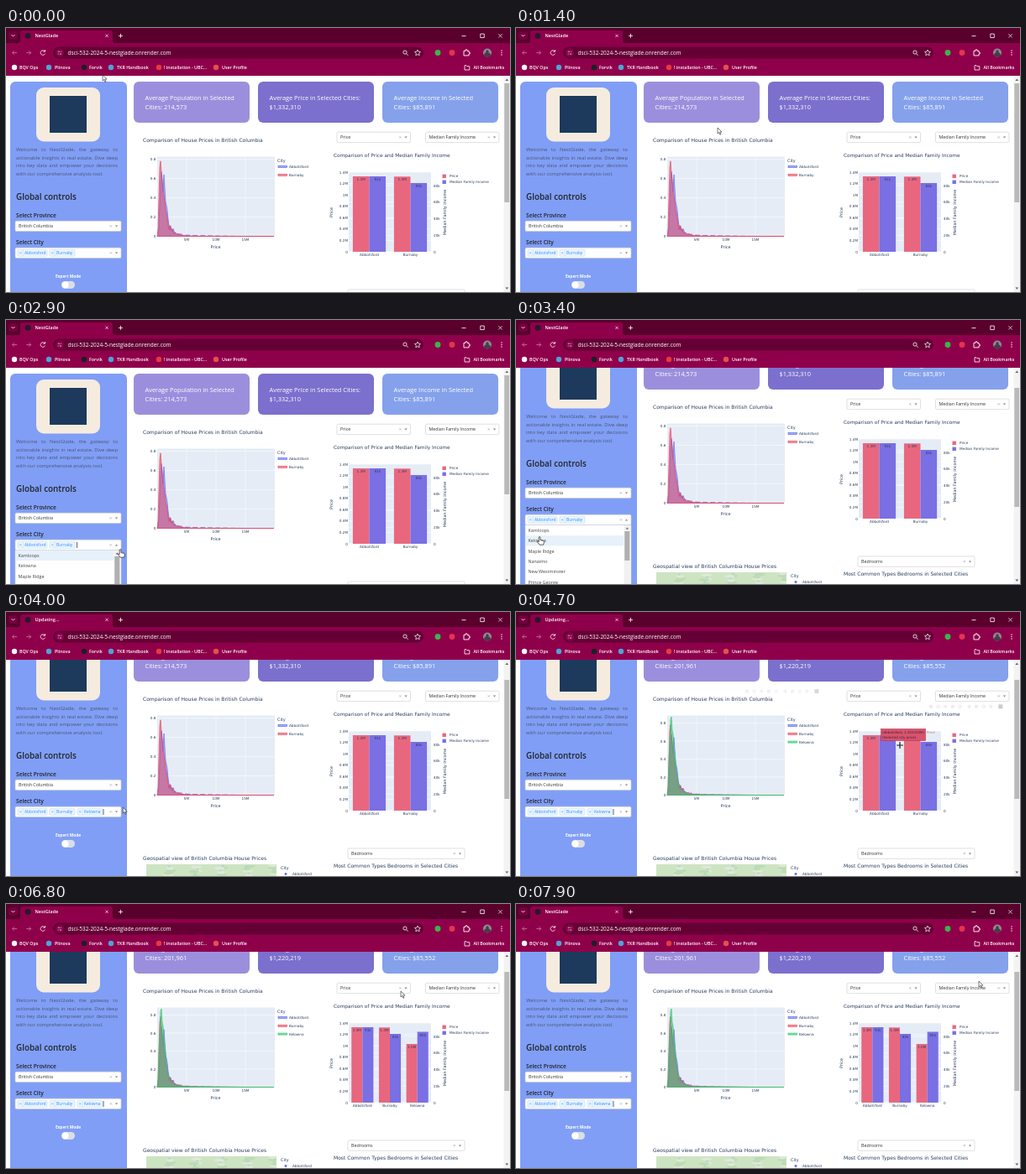
These frames come from a looping animation (600x315 px, 8000 ms). An HTML page:

```html
<!DOCTYPE html>
<html lang="en">
<head>
<meta charset="utf-8">
<title>NestGlade</title>
<style>
html, body { margin: 0; width: 100%; height: 100%; overflow: hidden; background: #fff; }
svg { display: block; width: 100vw; height: 100vh; font-family: "Open Sans", "Noto Sans", sans-serif; }
.plot { font-family: "DejaVu Sans", sans-serif; }
.intro { font-size: 5.9px; line-height: 9.5px; color: #4b5675; white-space: nowrap; }
.intro div { text-align-last: justify; }
.intro div:last-child { text-align-last: left; }
</style>
</head>
<body>
<svg id="stage" viewBox="0 0 600 315"></svg>
<script>
const LOOP = 8000, STEP = 100;
const T = { open: 2800, scroll: 3000, pick: 3700, data: 4300, bars: 6800 };
const INK = '#2a3f5f', BLUE = '#5f6df0', RED = '#e9455c', GREEN = '#2fc76b';
const PINK = '#e8677f', VIOLET = '#7a6fe3';

const rect = (x, y, w, h, fill, extra = '') =>
  `<rect x="${x}" y="${y}" width="${w}" height="${h}" fill="${fill}" ${extra}/>`;
const circle = (x, y, r, fill, extra = '') => `<circle cx="${x}" cy="${y}" r="${r}" fill="${fill}" ${extra}/>`;
const text = (x, y, s, size, fill = '#fff', extra = '') =>
  `<text x="${x}" y="${y}" font-size="${size}" fill="${fill}" ${extra}>${s}</text>`;
const line = (d, color, width = .8, extra = '') =>
  `<path d="${d}" fill="none" stroke="${color}" stroke-width="${width}" ${extra}/>`;
const shape = (d, fill, extra = '') => `<path d="${d}" fill="${fill}" ${extra}/>`;
const cross = (x, y, r, color, w = .7) =>
  line(`M${x - r} ${y - r}l${2 * r} ${2 * r}m0 ${-2 * r}l${-2 * r} ${2 * r}`, color, w);
const group = (s, extra) => `<g ${extra}>${s}</g>`;
const MID = 'text-anchor="middle"', END = 'text-anchor="end"', BOLD = 'font-weight="600"';

const clamp = v => Math.max(0, Math.min(1, v));
const smooth = v => (v = clamp(v), v * v * (3 - 2 * v));
const pulse = (t, a, b, c, d) => clamp((t - a) / (b - a)) * clamp((d - t) / (d - c));

function browser(t) {
  const busy = t >= T.pick && t < T.bars;
  const marks = [
    [10, 16, 'BQV Ops', '#f4f4f4'], [51, 58, 'Plinova', '#4fa3d8'], [93, 99, 'Forvik', '#1b1f24'],
    [125, 132, 'TKR Handbook', '#4fa3d8'], [182, 188, '! installation - UBC...', '#e33c3c'],
    [250, 257, 'User Profile', '#e0524a']];
  return rect(0, 0, 600, 57, '#8f004b') + rect(0, 0, 600, 18, '#59002d') +
    rect(3, 4, 11, 10, '#74003e', 'rx="3"') + line('M6.5 8l2 2 2-2', '#fff') +
    shape('M14 18q3 0 3-3V6q0-3 3-3h104q3 0 3 3v9q0 3 3 3z', '#8f004b') +
    circle(26, 9.3, 3.4, '#241a2b') +
    text(34.5, 11.4, busy ? 'Updating...' : 'NestGlade', 5.5, '#fff', BOLD) +
    cross(120, 9.3, 1.6, '#fff') + line('M134 9.3h5m-2.5-2.5v5', '#fff') +
    line('M542.5 9.5h5', '#fff') + line('M564.8 7h4.5v4.5h-4.5z', '#fff') + cross(588.5, 9.3, 2.2, '#fff') +
    line('M13 29.5h-5.4m2.3-2.3l-2.3 2.3 2.3 2.3', '#c27ba0') +
    line('M24.3 29.5h5.4m-2.3-2.3l2.3 2.3-2.3 2.3', '#c27ba0') +
    line('M46.3 28a2.8 2.8 0 1 0 .2 2.6m0-4.6v2.2h-2.2', '#fff') +
    rect(56, 22.5, 441, 14, '#650035', 'rx="7"') +
    circle(64, 29.5, 5, '#86004a') + line('M61.7 28.2h2.6m1 0h1m-4.6 2.8h1m1 0h2.6', '#fff', .7) +
    text(73.5, 32, 'dsci-532-2024-5-nestglade.onrender.com', 6.45) +
    circle(475, 29, 2.1, 'none', 'stroke="#fff" stroke-width=".8"') + line('M476.6 30.7l2 2', '#fff') +
    line('M490 26l1 2.2 2.5.3-1.8 1.7.5 2.5-2.2-1.2-2.2 1.2.5-2.5-1.8-1.7 2.5-.3z', '#fff', .7) +
    circle(514, 29.5, 3.4, '#39b54a') + circle(531, 29.5, 3.4, '#e5344e') +
    line('M545 27.3h2v-1.4h2v1.4h2v1.8h1.2v1.8h-1.2v2h-6z', '#fff', .9) +
    circle(573, 29.5, 5, '#8d8a93') + shape('M568.8 32.3a4.3 4.3 0 0 1 8.4 0a5 5 0 0 1-8.4 0z', '#453d48') +
    circle(573, 28, 1.7, '#453d48') +
    [27, 29.5, 32].map(y => circle(590, y, .7, '#fff')).join('') +
    marks.map(([x, tx, s, c]) => circle(x, 47, 3.2, c) + text(tx, 49.2, s, 5.3, '#fff', BOLD)).join('') +
    line('M546 44.7h2l.8 1h3v4.3h-5.8z', '#fff') + text(556.5, 49.2, 'All Bookmarks', 5.3, '#fff', BOLD);
}

function select(x, y, w, label = '', open = false) {
  const ax = x + w - 7.2;
  return rect(x, y, w, 12.4, '#fff', 'rx="1.5" stroke="#ccc" stroke-width=".6"') +
    text(x + 4, y + 8.2, label, 5.3, '#333') + cross(x + w - 12.2, y + 6.2, 1, '#999', .6) +
    shape(open ? `M${ax} ${y + 7.2}h3.4l-1.7-2z` : `M${ax} ${y + 5.4}h3.4l-1.7 2z`, '#888');
}

function tag(x, w, s) {
  return rect(x, 264.4, w, 8, '#ebf5ff', 'rx="1" stroke="#b9dbff" stroke-width=".5"') +
    line(`M${x + 6.2} 264.4v8`, '#b9dbff', .5) + cross(x + 3.2, 268.4, .9, '#2a8cff', .5) +
    text(x + 8, 270.3, s, 4.9, '#2a8cff');
}

function menu(t) {
  const items = ['Kamloops', 'Kelowna', 'Maple Ridge', 'Nanaimo', 'New Westminster', 'Prince George', 'Richmond'];
  const active = t < 3200 ? 0 : 1;
  return rect(11, 274.5, 126, 90, '#fff', 'stroke="#ccc" stroke-width=".6"') +
    rect(11.3, 274.8 + active * 12.4, 117, 12.2, '#e6f1fb') +
    items.map((s, i) => text(14.5, 282.7 + i * 12.4, s, 5.4, '#444')).join('') +
    rect(128.5, 275, 8, 89, '#f1f1f1') + rect(129.3, 282, 6, 35, '#b0b0b0') +
    shape('M130.6 279.6h3.6l-1.8-2z', '#666');
}

function sidebar(t) {
  const picked = t >= T.pick, open = t >= T.open && !picked;
  const caretOn = t >= T.open && (t - (picked ? T.pick : T.open)) % 1000 < 500;
  const intro = ['Welcome to NestGlade, the gateway to', 'actionable insights in real estate. Dive deep',
    'into key data and empower your decisions', 'with our comprehensive analysis tool.'];
  return rect(5, 64, 139, 400, '#809ef5', 'rx="6"') +
    rect(36, 71, 76, 64.5, '#f5ecdf', 'rx="9"') + rect(52, 81, 44, 44, '#1d3a5c') +
    `<foreignObject x="12" y="141.2" width="121" height="42"><div class="intro">${intro.map(s => `<div>${s}</div>`).join('')}</div></foreignObject>` +
    text(12, 205.3, 'Global controls', 9.9, '#212529', BOLD) +
    text(12, 226, 'Select Province', 6.6, '#212529', BOLD) + select(11, 230.2, 126, 'British Columbia') +
    text(12, 257.8, 'Select City', 6.6, '#212529', BOLD) + select(11, 262.2, 126, '', open) +
    tag(14, 35, 'Abbotsford') + tag(52, 30, 'Burnaby') + (picked ? tag(85, 29.5, 'Kelowna') : '') +
    (caretOn ? line(`M${picked ? 116 : 84.5} 265v7`, '#222', .7) : '') +
    text(74, 297.6, 'Expert Mode', 4.8, '#fff', 'font-weight="700" ' + MID) +
    rect(66, 302, 16, 9, '#dcdee6', 'rx="4.5"') + circle(70.6, 306.5, 4, '#fff') +
    (open ? menu(t) : '');
}

function cards(t) {
  const value = t >= T.data ? ['201,961', '$1,220,219', '$85,552'] : ['214,573', '$1,332,310', '$85,891'];
  return [
    [152, '#9b8fdd', 'Average Population in Selected', 'Cities: ' + value[0]],
    [300, '#7b70cd', 'Average Price in Selected Cities:', value[1]],
    [448, '#85a1eb', 'Average Income in Selected', 'Cities: ' + value[2]]
  ].map(([x, c, a, b]) => rect(x, 64, 138, 49, c, 'rx="6"') +
    text(x + 13.5, 86, a, 7.4) + text(x + 13.5, 97.2, b, 7.4)).join('');
}

// Density outline: a list of heights one pixel apart, then a rough decaying tail.
function density(heights, decay, seed, unit, color) {
  const n = heights.length;
  let d = 'M180 248.5';
  for (let i = 0; i < 139; i++) {
    const over = i - n + 1, rough = .75 + .25 * Math.sin(i * 2.1 + seed);
    const bump = .018 * Math.max(0, Math.sin(i * .7 + seed)) * clamp(1 - i / 100);
    const v = over <= 0 ? heights[i] : heights[n - 1] * Math.exp(-over / decay) * rough + bump;
    d += `L${181 + i} ${(248.5 - v * unit).toFixed(1)}`;
  }
  return shape(d + 'V248.5z', color, `fill-opacity=".5" stroke="${color}" stroke-width=".7"`);
}

function histogram(t) {
  const three = t >= T.data, unit = three ? 107.5 : 115;
  const names = [['Abbotsford', BLUE], ['Burnaby', RED], ['Kelowna', GREEN]].slice(0, three ? 3 : 2);
  let s = text(163, 135.6, 'Comparison of House Prices in British Columbia', 6, INK) +
    rect(180, 153.5, 140, 95.3, '#e5ecf6');
  for (let i = 0; i < 5; i++) {
    const y = 248.5 - i * .2 * unit;
    s += line(`M180 ${y}h140`, '#fff', .5) + text(178.5, y + 1.5, i ? (i * .2).toFixed(1) : 0, 4.2, INK, END);
  }
  for (const m of [5, 10, 15]) {
    const x = 180 + m * 7;
    s += line(`M${x} 153.5v95`, '#fff', .5) + text(x, 253.6, m + 'M', 4.2, INK, MID);
  }
  s += density([.02, .1, .34, .58, .67, .56, .46, .64, .5, .36, .32, .27, .18], 6, 1, unit, BLUE) +
    density([.08, .4, .72, .78, .66, .6, .47, .42, .36, .27, .24, .19], 6, 3, unit, RED);
  if (three) s += density([.1, .36, .6, .84, .87, .72, .68, .55, .47, .38, .27, .18, .14], 5, 5, unit, GREEN);
  s += text(249.5, 262.6, 'Price', 4.9, INK, MID) + text(323, 160, 'City', 4.9, INK);
  names.forEach(([name, c], i) => {
    s += rect(324, 164.5 + i * 9.8, 10.5, 2, c, `fill-opacity=".55" stroke="${c}" stroke-width=".7"`) +
      text(337, 167.2 + i * 9.8, name, 4.2, INK);
  });
  return s;
}

function barChart(t) {
  const three = t >= T.bars;
  const cities = [['Abbotsford', 177, '1.3M', 177, '91k'], ['Burnaby', 177.3, '1.3M', 185, '83k'],
    ['Kelowna', 197, '1.0M', 182.5, '85k']].slice(0, three ? 3 : 2);
  const pitch = 98 / cities.length, w = pitch * .4;
  let s = text(390, 154, 'Comparison of Price and Median Family Income', 5.85, INK) + rect(408, 172, 98, 95, '#e5ecf6');
  for (let i = 0; i < 8; i++) {
    const y = 267 - i * 13.57;
    s += line(`M408 ${y}h98`, '#fff', .5) + text(407, y + 1.5, i ? +(i * .2).toFixed(1) + 'M' : 0, 4.2, INK, END);
  }
  for (let i = 0; i < 5; i++) {
    const y = 267 - i * 19.75;
    s += line(`M408 ${y}h98`, '#fff', .5) + text(509, y + 1.5, i ? i * 20 + 'k' : 0, 4.2, INK);
  }
  cities.forEach(([name, y1, l1, y2, l2], i) => {
    const x = 408 + pitch * (i + .5);
    s += rect(x - w, y1, w, 267 - y1, PINK) + rect(x, y2, w, 267 - y2, VIOLET) +
      text(x - w / 2, y1 + 5, l1, 4.2, INK, MID) + text(x + w / 2, y2 + 5, l2, 4.2, INK, MID) +
      text(x, 271.6, name, 4.2, INK, MID);
  });
  s += text(0, 0, 'Price', 4.9, INK, MID + ' transform="translate(388.5 220)rotate(-90)"') +
    text(0, 0, 'Median Family Income', 4.9, INK, MID + ' transform="translate(523.5 220)rotate(-90)"') +
    rect(519.5, 174.6, 4.4, 4.4, PINK) + text(528, 178.4, 'Price', 4.2, INK) +
    rect(519.5, 181.6, 4.4, 4.4, VIOLET) + text(528, 185.3, 'Median Family Income', 4.2, INK);
  if (t >= 4500 && t < 4900) {
    s += rect(434.5, 169.5, 53, 14, '#d9536d', 'stroke="#b83550" stroke-width=".6"') +
      text(436, 175.4, '(Abbotsford, 1.332310M)', 4, '#3f2338') + text(436, 181, '(Selected city price)', 4, '#3f2338') +
      text(489, 175, 'Price', 4, '#c9748a');
  }
  return s;
}

function modebar(x, y, count, alpha) {
  if (alpha <= 0) return '';
  let s = '';
  for (let i = 0; i < count; i++) {
    const cx = x + i * 8.6 + (i > 4 ? 2.5 : 0);
    s += i % 3 == 1 ? circle(cx, y, 1.7, 'none', 'stroke="#8b8f99" stroke-width=".9"')
      : i % 3 == 2 ? line(`M${cx - 2.3} ${y}h4.6m-2.3-2.3v4.6`, '#8b8f99', .9)
      : rect(cx - 2, y - 2, 4, 4, '#b4b7bf', 'rx=".6"');
  }
  return group(s + rect(x + count * 8.6 + 3, y - 2.5, 5, 5, '#33354a'), `opacity="${alpha}"`);
}

function lower() {
  const patch = (i, fill, size) => `<ellipse cx="${167 + (i * 61.8) % 155}" cy="${332 + (i * 7.3) % 13}" ` +
    `rx="${size * (1.5 + i % 3)}" ry="${size}" fill="${fill}"/>`;
  let land = rect(167, 331, 155, 40, '#cde4c3');
  for (let i = 1; i < 30; i++) land += i % 3 ? patch(i, i % 2 ? '#dfe8d6' : '#bddcb1', 1.8) : patch(i, '#a5d3df', 1);
  return text(163, 326.3, 'Geospatial view of British Columbia House Prices', 6, INK) +
    `<clipPath id="map"><rect x="167" y="331" width="155" height="40"/></clipPath>` + group(land, 'clip-path="url(#map)"') +
    text(327, 337, 'City', 4.9, INK) + circle(333, 342.6, 1.5, BLUE) + text(341, 344, 'Abbotsford', 4.2, INK) +
    text(390, 334.5, 'Most Common Types Bedrooms in Selected Cities', 6, INK);
}

const track = [[0, 115, 56], [1400, 240, 119], [2700, 136, 274], [3000, 136, 274], [3300, 28, 259],
  [3700, 28, 259], [4600, 457, 159], [4800, 457, 159], [5700, 425, 112], [6800, 470, 104], [7900, 551, 92]];

function pointer(t) {
  const k = Math.max(1, track.findIndex(p => p[0] >= t));
  const [a, b] = [track[k - 1], track[k]], u = smooth((t - a[0]) / (b[0] - a[0]));
  const x = a[1] + (b[1] - a[1]) * u, y = a[2] + (b[2] - a[2]) * u;
  const at = `transform="translate(${x} ${y})"`;
  const shift = t > T.scroll ? 30 : 0;
  const inside = (l, top, r, bottom) => x > l && x < r && y + shift > top && y + shift < bottom;
  if (t >= 2700 && t <= T.pick)
    return shape('M-.8 0q1-1 1.8 0v3.6l3.6.8q1 .3.8 1.4l-.7 3.4h-4.6l-3-3.6q.6-1.2 2.1.1z', '#fff', at + ' stroke="#222" stroke-width=".7"');
  if (inside(180, 153, 320, 249) || inside(408, 172, 506, 267))
    return group(line('M-4.5 0h9m-4.5-4.5v9', '#fff', 2.2) + line('M-4 0h8m-4-4v8', '#111', 1.2), at);
  return shape('M0 0v7l1.6-1.5 1.3 2.8 1.1-.5-1.3-2.7h2.3z', '#fff', at + ' stroke="#222" stroke-width=".6"');
}

function scene(t) {
  const scroll = 30 * smooth((t - T.scroll) / 300);
  const page = sidebar(t) + cards(t) +
    group(histogram(t) + barChart(t) + lower(), 'class="plot"') +
    select(394, 124.2, 87.5, 'Price') + select(499.5, 124.2, 87.5, 'Median Family Income') +
    select(407, 312, 139, 'Bedrooms') +
    modebar(275, 124.5, 9, .9 * pulse(t, 4000, 4200, 4300, 4800)) +
    modebar(494, 142.8, 9, pulse(t, 4500, 5300, 6300, 6600));
  const bar = rect(592.5, 57, 7.5, 258, '#f3f3f3') +
    rect(593.3, 66 + scroll / 2, 5.8, 142, '#b9b9b9') +
    shape('M594.4 63h3.8l-1.9-2.4z', '#666') + shape('M594.4 309.6h3.8l-1.9 2.4z', '#666');
  return rect(0, 0, 600, 315, '#fff') + group(page, `transform="translate(0 ${-scroll})"`) +
    bar + browser(t) + pointer(t);
}

const stage = document.getElementById('stage');
let shown = -1;
function tick(now) {
  const t = Math.floor(now % LOOP / STEP) * STEP;
  if (t !== shown) stage.innerHTML = scene(shown = t);
  requestAnimationFrame(tick);
}
tick(performance.now());
</script>
</body>
</html>
```
